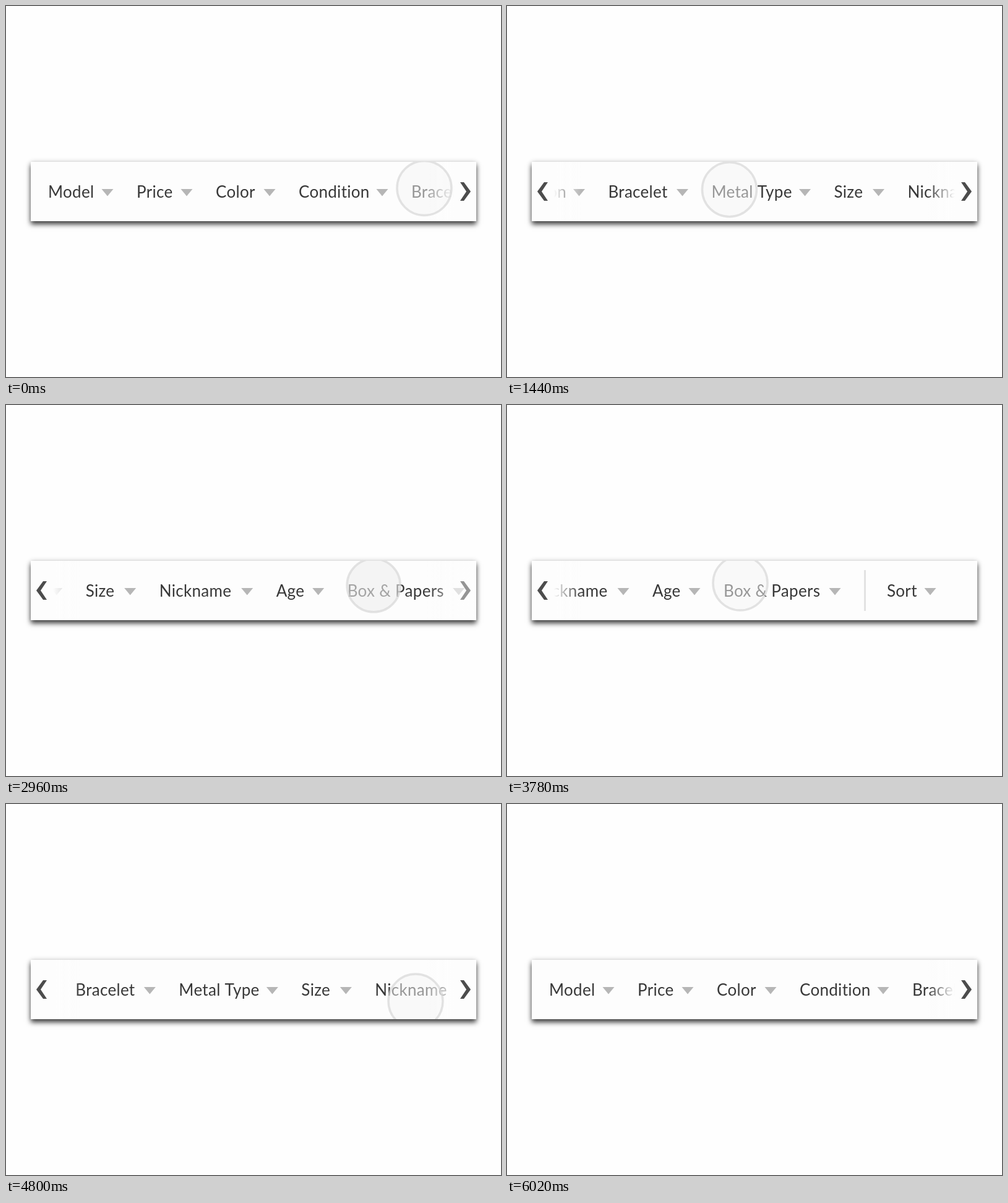
Animation of 800 by 600 pixels, one loop 6700 ms. Source, as an HTML page with a canvas:

```html
<!DOCTYPE html>
<html lang="en">
<head>
<meta charset="utf-8">
<title>Scrolling filter bar</title>
<style>
  html, body { margin: 0; width: 100%; height: 100%; overflow: hidden; background: #fefefe; }
  #bar {
    position: absolute; left: 40px; top: 252px; width: 720px; height: 96px;
    background: #fdfdfd; box-shadow: 0 5px 8px rgba(0, 0, 0, .75), 0 0 8px rgba(0, 0, 0, .12);
  }
  canvas { display: block; }
</style>
</head>
<body>
<div id="bar"><canvas width="720" height="96"></canvas></div>
<script>
const ctx = document.querySelector('canvas').getContext('2d');
const LOOP = 6700, STEP = 20, MAX_SCROLL = 1093, STRIP_END = 1824;
const RETURN_START = 4520, REST_START = 6000;

// Label and left edge; the empty label is the divider
const items = [
  ['Model', 68], ['Price', 211], ['Color', 339], ['Condition', 473], ['Bracelet', 655],
  ['Metal Type', 822], ['Size', 1020], ['Nickname', 1139], ['Age', 1328],
  ['Box & Papers', 1443], ['', 1670], ['Sort', 1707]
];

// Pointer moves: each leg starts where the last one stopped
const legs = [
  { from: 180, to: 280, x: 651, y: 296 },
  { from: 500, to: 1200, x: 159.5, y: 296, drag: true },
  { from: 1200, to: 1780, x: 697, y: 298 },
  { from: 1780, to: 2275, x: 425, y: 281, drag: true },
  { from: 2275, to: 2707, x: 722, y: 294 },
  { from: 2707, to: 3320, x: 377, y: 288, drag: true },
  { from: 3780, to: 4420, x: 111, y: 288 },
  { from: RETURN_START, to: 4800, x: 662, y: 319, drag: true },
  { from: 4800, to: 5840, x: 675, y: 282 },
  { from: 5860, to: 5960, x: 735, y: 190 }
];

const clamp01 = v => Math.max(0, Math.min(1, v));
const ease = u => u * u * (3 - 2 * u);

// Damped spring that carries the strip back to its start
function springBack(t) {
  if (t >= REST_START) return 0;
  const a = (t - RETURN_START) * .00364;
  return MAX_SCROLL * Math.exp(-a) * (Math.cos(a) + Math.sin(a));
}

function stateAt(t) {
  let x = 676, y = 294.5, scroll = 0, press = 0;
  for (const leg of legs) {
    if (t < leg.from) break;
    const u = ease(clamp01((t - leg.from) / (leg.to - leg.from)));
    const dx = (leg.x - x) * u;
    x += dx;
    y += (leg.y - y) * u;
    if (leg.drag) {
      scroll = Math.min(MAX_SCROLL, scroll - dx);
      press = 4 * u * (1 - u);
    }
  }
  if (t >= RETURN_START) scroll = springBack(t);
  return { x, y, scroll, press };
}

function polygon(points, color) {
  ctx.fillStyle = color;
  ctx.beginPath();
  points.forEach(([x, y]) => ctx.lineTo(x, y));
  ctx.fill();
}

function drawItems(scroll) {
  ctx.font = '26px Lato, sans-serif';
  ctx.letterSpacing = '.3px';
  items.forEach(([label, left], i) => {
    const next = i + 1 < items.length ? items[i + 1][1] : STRIP_END;
    const x = left - scroll, arrow = next - 47 - scroll;
    ctx.fillStyle = label ? '#383838' : '#e2e2e2';
    if (!label) return ctx.fillRect(x, 267, 3, 66);
    ctx.fillText(label, x, 310);
    polygon([[arrow - 9.5, 296], [arrow + 9.5, 296], [arrow, 307.5]], '#b6b6b6');
  });
}

// Edge fade and chevron; side is -1 for left, 1 for right
function drawEdge(side, alpha) {
  const at = d => 400 + side * d;
  ctx.globalAlpha = alpha;
  const fade = ctx.createLinearGradient(at(280), 0, at(324), 0);
  fade.addColorStop(0, 'rgba(253,253,253,0)');
  fade.addColorStop(1, '#fdfdfd');
  ctx.fillStyle = fade;
  ctx.fillRect(side < 0 ? 40 : 680, 252, 80, 96);
  polygon([[334, 285], [340, 285], [351, 300], [340, 315], [334, 315], [344, 300]]
    .map(([d, y]) => [at(d), y]), '#4c4c4c');
  ctx.globalAlpha = 1;
}

function drawPointer(x, y, press) {
  const shade = 245 - 7 * press;
  ctx.beginPath();
  ctx.arc(x, y, 44 - press, 0, 2 * Math.PI);
  ctx.fillStyle = `rgba(${shade},${shade},${shade},${.5 + .1 * press})`;
  ctx.fill();
  ctx.lineWidth = 3.5;
  ctx.strokeStyle = 'rgba(212,212,212,.65)';
  ctx.stroke();
}

function draw(t) {
  const { x, y, scroll, press } = stateAt(t);
  ctx.setTransform(1, 0, 0, 1, -40, -252);
  ctx.clearRect(40, 252, 720, 96);
  drawItems(scroll);
  drawEdge(-1, clamp01(scroll / 340));
  drawEdge(1, clamp01((MAX_SCROLL - scroll) / 340));
  drawPointer(x, y, press);
}

const start = performance.now();
function frame() {
  const t = (performance.now() - start) % LOOP;
  draw(t - t % STEP);
  requestAnimationFrame(frame);
}
frame();
</script>
</body>
</html>
```
